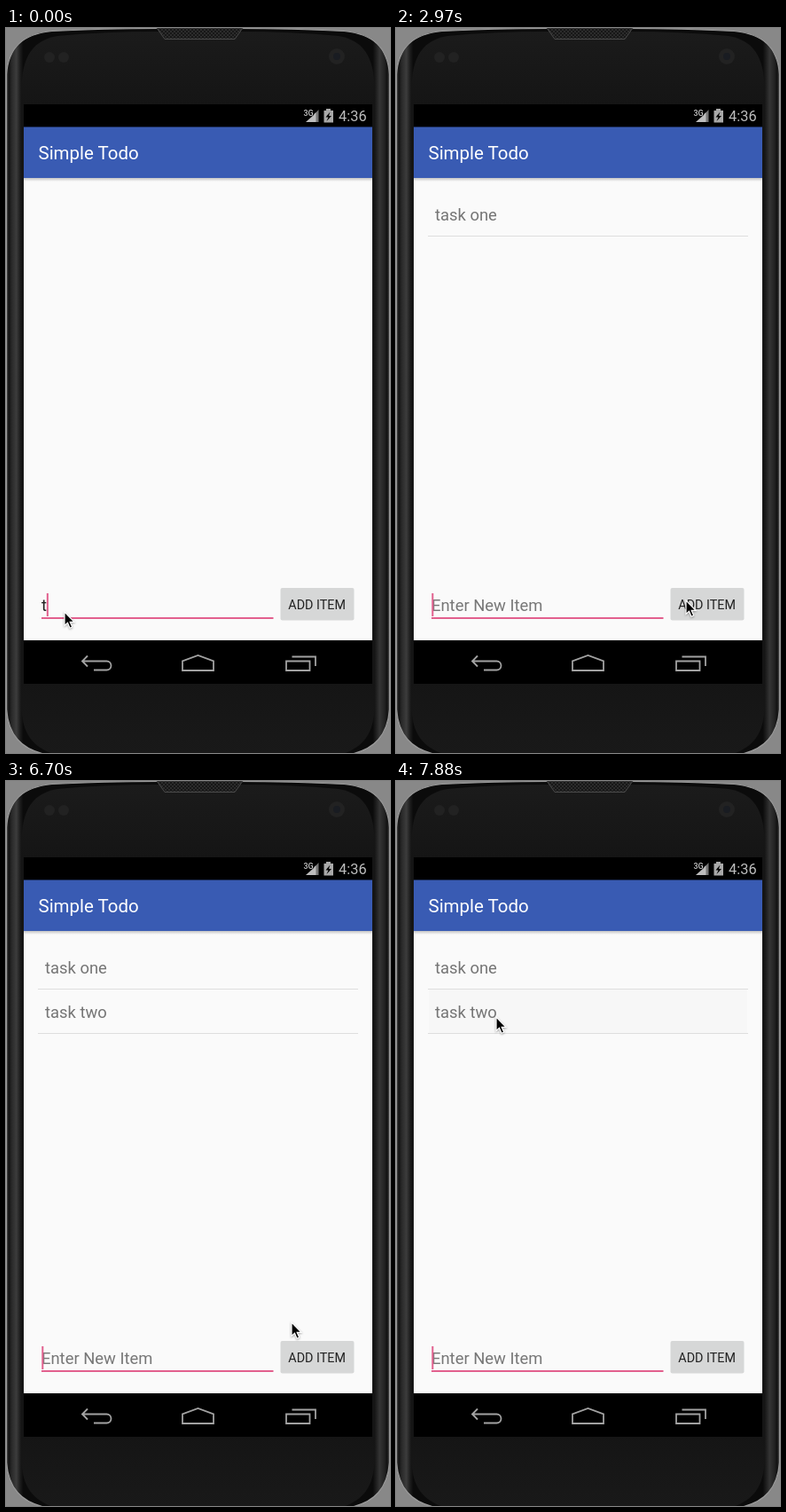
Animation of 433 by 817 pixels, one loop 8000 ms. Source, as an HTML page:

```html
<!DOCTYPE html>
<html lang="en">
<head>
<meta charset="utf-8">
<title>Simple Todo</title>
<style>
  html, body { margin: 0; width: 100%; height: 100%; overflow: hidden; background: #888; }
  svg { display: block; width: 433px; height: 817px; font-family: Roboto, sans-serif; }
  text { white-space: pre; }
  .item { font-size: 18.4px; fill: #757575; }
  .nav { fill: none; stroke: #a2a2a2; stroke-width: 1.8; }
  .divider { stroke: #dedede; }
</style>
</head>
<body>
<svg viewBox="0 0 433 817">
  <defs>
    <linearGradient id="side">
      <stop offset="0" stop-color="#4a4a4a"/>
      <stop offset=".006" stop-color="#101010"/>
      <stop offset=".013" stop-color="#282828"/>
      <stop offset=".026" stop-color="#3c3c3c"/>
      <stop offset=".036" stop-color="#1c1c1c"/>
      <stop offset=".044" stop-color="#0b0b0b"/>
      <stop offset=".956" stop-color="#0b0b0b"/>
      <stop offset=".964" stop-color="#1c1c1c"/>
      <stop offset=".974" stop-color="#343434"/>
      <stop offset=".987" stop-color="#222"/>
      <stop offset=".994" stop-color="#101010"/>
      <stop offset="1" stop-color="#4a4a4a"/>
    </linearGradient>
    <linearGradient id="glass" x2="0" y2="1">
      <stop offset="0" stop-color="#1b1b1b"/>
      <stop offset=".1" stop-color="#151515"/>
      <stop offset=".9" stop-color="#151515"/>
      <stop offset="1" stop-color="#191919"/>
    </linearGradient>
    <linearGradient id="shade" x2="0" y2="1">
      <stop offset="0" stop-color="#c4c4c4"/>
      <stop offset="1" stop-color="#fafafa"/>
    </linearGradient>
    <pattern id="mesh" width="4" height="4" patternUnits="userSpaceOnUse">
      <rect width="4" height="4" fill="#2c2c2c"/>
      <path d="M0 4L4 0M0 0L4 4" stroke="#171717"/>
    </pattern>
  </defs>

  <!-- phone body -->
  <rect width="433" height="817" fill="#888"/>
  <path fill="url(#side)" stroke="#9b9b9b" stroke-width="1.2"
    d="M.5 52C3 22 18 7 52 3.500Q110 .5 172 .5H261Q323 .5 381 3.500C415 7 430 22 432.500 52V768C430 796 417 813 386 819H47C16 813 3 796 .5 768Z"/>
  <path fill="url(#glass)"
    d="M17 78C17 38 25 15 58 9Q110 4 172 4H261Q323 4 375 9C408 15 416 38 416 78V756C416 790 408 808 380 818H53C25 808 17 790 17 756Z"/>
  <path d="M170 0H267L258 12.500H179Z" fill="url(#mesh)" stroke="#4b4b4b"/>
  <g fill="#222">
    <circle cx="49" cy="33" r="6"/><circle cx="65" cy="33" r="6"/>
    <circle cx="373" cy="32" r="9"/><circle cx="373" cy="32" r="4" fill="#191c22"/>
  </g>

  <!-- screen -->
  <rect x="20" y="86" width="393" height="653"/>
  <rect x="20" y="169" width="393" height="521" fill="#fafafa"/>
  <rect x="20" y="169" width="393" height="4" fill="url(#shade)"/>
  <rect x="20" y="111.500" width="393" height="57.500" fill="#395bb3"/>
  <text x="36.500" y="148" font-size="20.470" fill="#fff">Simple Todo</text>

  <!-- status bar -->
  <text x="335.500" y="99" font-size="9" font-weight="500" fill="#c4c4c4">3G</text>
  <path d="M338 106L347 98V106Z" fill="#bdbdbd"/>
  <path d="M348 97L352.500 92V106H348Z" fill="#777"/>
  <path d="M347 97.500L349.500 95V106H347Z" fill="#bdbdbd"/>
  <path d="M361 91H366V93H369V106.500H358.500V93H361Z" fill="#a9a9a9"/>
  <path d="M365.500 94.500L360.500 100.500H363.500L361.500 105L367 99H364Z" fill="#000"/>
  <text x="375" y="105" font-size="16.400" fill="#bdbdbd">4:36</text>

  <!-- navigation bar -->
  <g class="nav">
    <path d="M92 707.500L86 713.500L92 719.500M86 713.500H113.500A4.800 4.800 0 0 1 113.500 723.500H99"/>
    <path d="M199 724V713.500L216.500 707L234 713.500V724Z"/>
    <path d="M316 713.500H342.500V724H316ZM322.500 708.500H349V719"/>
  </g>

  <!-- list -->
  <g id="row1">
    <text class="item" x="44" y="216.500">task one</text>
    <path class="divider" d="M36 234.500H397"/>
  </g>
  <g id="row2">
    <rect id="press" x="37" y="235" width="359" height="49" fill-opacity=".01"/>
    <text class="item" x="44" y="266.500">task two</text>
    <path class="divider" d="M36 284.500H397"/>
  </g>

  <!-- entry -->
  <text id="entry" x="40" y="657" font-size="18.400"></text>
  <rect x="40" y="664" width="261.500" height="2" fill="#e2608e"/>
  <rect id="caret" y="637" width="2" height="26" fill="#e2608e"/>
  <rect id="button" x="309.500" y="631" width="83" height="36.500" rx="2"/>
  <text x="318.300" y="655" font-size="14.330" fill="#222">ADD ITEM</text>

  <path id="pointer" d="M0 0V15.500L3.500 12.300L6 18.200L8.700 17L6.200 11.300H11Z"
    stroke="#fff" stroke-width="1.200" style="filter:drop-shadow(0 1px 1px #0005)"/>
</svg>
<script>
const LOOP = 8000;

// Each track holds [start ms, value] steps.
const typed = [
  [0, 't'], [150, 'ta'], [300, 'tas'], [750, 'task'], [890, 'task '],
  [1040, 'task o'], [1190, 'task on'], [1490, 'task one'], [2530, ''],
  [3570, 't'], [3720, 'ta'], [3870, 'tas'], [4020, 'task'], [4170, 'task '],
  [4320, 'task t'], [4470, 'task tw'], [4620, 'task two'], [5660, '']
];
const caretOn = [
  [0, true], [2080, false], [2530, true], [3120, false], [3570, true],
  [5210, false], [5660, true], [6250, false], [6700, true], [7290, false], [7740, true]
];
const pointerAt = [
  [0, [66, 658]], [1640, [132, 657]], [1790, [252, 651]], [1930, [325, 647]],
  [2080, [339, 647]], [2830, [327, 645]], [2980, [268, 644]], [3120, [232, 645]],
  [5060, [258, 639]], [5210, [314, 630]], [5360, [330, 638.5]],
  [6700, [322, 610]], [6850, [276, 510]], [7000, [203, 385]],
  [7150, [142, 294]], [7290, [117, 268]], [7440, [113, 266]]
];

const at = (track, t) => track.findLast(([start]) => start <= t)[1];
const $ = id => document.getElementById(id);
const [row1, row2, press, entry, caret, button, pointer] =
  ['row1', 'row2', 'press', 'entry', 'caret', 'button', 'pointer'].map($);
const show = (el, on) => el.setAttribute('visibility', on ? 'inherit' : 'hidden');

function draw(t) {
  const text = at(typed, t);
  entry.textContent = text || 'Enter New Item';
  entry.setAttribute('fill', text ? '#222' : '#777');
  caret.setAttribute('x', 40.3 + (text ? entry.getComputedTextLength() - 0.5 : 0));
  show(caret, at(caretOn, t));
  show(row1, t >= 2530);
  show(row2, t >= 5660);
  show(press, t >= 7880);
  if (t < 5660) show(press, false);
  button.setAttribute('fill', t >= 2380 && t < 2530 ? '#b7b9b9' : '#d6d7d7');
  pointer.setAttribute('transform', `translate(${at(pointerAt, t)})`);
}

function tick() {
  draw(performance.now() % LOOP);
  requestAnimationFrame(tick);
}
tick();
</script>
</body>
</html>
```
